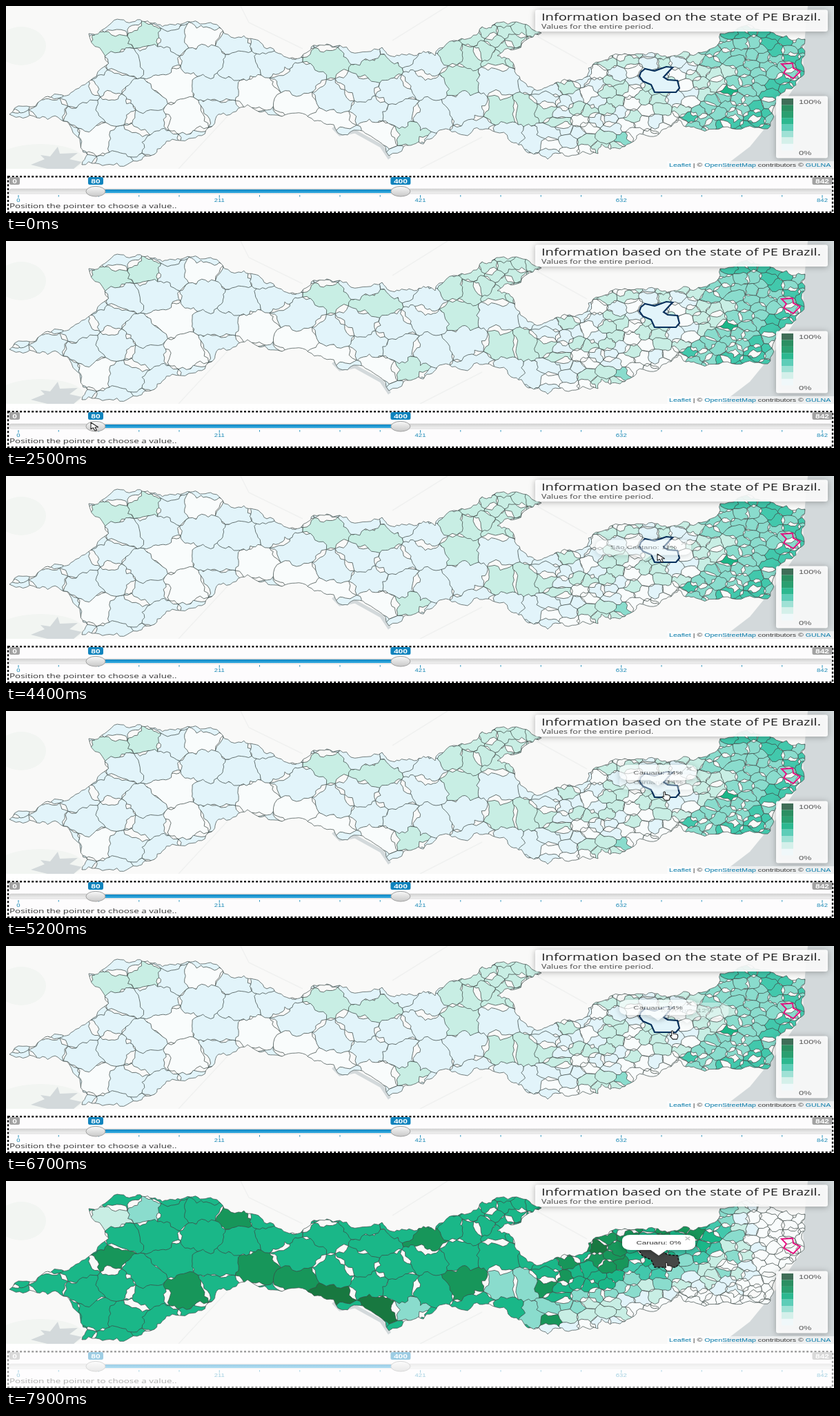
These frames come from a looping animation (1200x300 px, 8 s). An HTML page:

```html
<!DOCTYPE html>
<html lang="en">
<head>
<meta charset="utf-8">
<title>State map with range slider</title>
<style>
html, body { margin: 0; width: 100%; height: 100%; overflow: hidden; background: #fff; }
svg { display: block; width: 100%; height: 100%; }
text { font-family: "Liberation Sans", Arial, sans-serif; }
.ui { font-family: "Open Sans", sans-serif; }
.card { filter: drop-shadow(0 1px 4px rgba(0, 0, 0, .32)); }
</style>
</head>
<body>
<svg id="stage" viewBox="0 0 1200 300" preserveAspectRatio="none">
  <defs>
    <clipPath id="land"><path id="landClip"/></clipPath>
    <clipPath id="mapBox"><rect width="1200" height="236"/></clipPath>
    <linearGradient id="knob" x2="0" y2="1">
      <stop stop-color="#fafafa"/><stop offset=".5" stop-color="#e0e0e0"/><stop offset="1" stop-color="#c8c8c8"/>
    </linearGradient>
    <linearGradient id="groove" x2="0" y2="1">
      <stop stop-color="#d2d2d2"/><stop offset="1" stop-color="#f4f4f4"/>
    </linearGradient>
    <linearGradient id="range" x2="0" y2="1">
      <stop stop-color="#0f86c2"/><stop offset="1" stop-color="#35ace2"/>
    </linearGradient>
  </defs>
  <g clip-path="url(#mapBox)">
    <rect width="1200" height="236" fill="#f9f9f8"/>
    <g fill="#f2f5f2">
      <ellipse cx="22" cy="58" rx="36" ry="28"/>
      <ellipse cx="50" cy="222" rx="62" ry="22"/>
    </g>
    <path fill="none" stroke="#f0f1f0" stroke-width="1.5" d="M340 0 352 24 430 62M560 50 640 0M770 44 842 84M250 236 330 150M600 236 690 190"/>
    <path fill="#d3d9db" d="M1162 0H1200V236H1036L1078 204 1114 160 1156 98 1155 75Z"/>
    <path fill="#d3d9db" d="M36 230 56 222 50 216 64 218 75 204 78 214 104 213 92 222 110 226 98 236 60 236Z"/>
    <path fill="none" stroke="#d3d9db" stroke-width="5" d="M474 176 484 186 506 182 544 203 556 221"/>
    <g id="map"></g>
  </g>
  <g id="chrome"></g>
  <g id="panel"></g>
  <g id="popups"></g>
  <g id="pointer" stroke="#222" stroke-width="1.1" stroke-linejoin="round" fill="#fff">
    <path id="arrow" d="M0 0 0 9.5 3.2 7.6 6 12 8.4 11.2 6 7 10.5 6.8Z"/>
    <path id="hand" d="M3 1Q4.2-.6 5.4 1L5.6 4.6 8 4.4 12 5.8 12.4 9 11 12.5 5 12.5 1.2 8.2Q.6 6.2 3.4 7.6Z"/>
  </g>
</svg>
<script>
const NS = 'http://www.w3.org/2000/svg';
const LOOP = 8000, STEP = 100, RECALC = 7800, FADE = 300;
const SQUASH = 0.69;              // the whole page is flattened vertically
const TONES = ['#f9fcfc', '#e2f4fa', '#c8eee4', '#8adccd', '#42c8ac', '#1ab788', '#17965a', '#187840', '#454746'];
const $ = id => document.getElementById(id);
const clamp = (v, lo = 0, hi = 1) => Math.min(hi, Math.max(lo, v));

function add(parent, tag, attrs, text) {
  const el = document.createElementNS(NS, tag);
  for (const k in attrs) el.setAttribute(k, attrs[k]);
  if (text) el.textContent = text;
  parent.appendChild(el);
  return el;
}
const label = (parent, x, y, size, text, attrs) => add(parent, 'text', {
  transform: `translate(${x} ${y}) scale(1 ${SQUASH})`, 'font-size': size, fill: '#333', ...attrs }, text);

// ---- geometry ----
const points = s => s.split(' ').map(p => p.split(',').map(Number));
const noise = (x, y) => {
  const s = Math.sin(x * 12.9898 + y * 78.233) * 43758.5453;
  return s - Math.floor(s);
};
// Roughens an edge by shifting its middle; both directions give the same line.
function bend(p, q, k) {
  const dx = q[0] - p[0], dy = q[1] - p[1], len = Math.hypot(dx, dy);
  if (!k || len < 7) return [p];
  const mx = (p[0] + q[0]) / 2, my = (p[1] + q[1]) / 2;
  const s = (noise(Math.round(mx), Math.round(my)) - 0.5) * k * Math.min(1, 24 / len);
  const m = [mx - dy * s, my + dx * s];
  return [...bend(p, m, k), ...bend(m, q, k)];
}
const outline = (pts, k) => 'M' + pts.flatMap((p, i) => bend(p, pts[(i + 1) % pts.length], k))
  .map(p => p.map(v => v.toFixed(1)).join(' ')).join('L') + 'Z';

const north = '5,157 46,140 97,124 131,102 149,83 120,40 150,27 183,23 300,26 337,45 366,50 378,62 411,76 465,55 484,57 500,67 545,60 556,72 612,66 622,72 660,47 690,30 740,23 776,39 712,72 736,85 756,117 783,118 838,104 844,90 875,73 945,69 1000,70 1030,58 1035,40 1085,33 1158,48';
const south = '1157,95 1116,140 1104,178 1000,177 975,165 950,180 914,188 890,207 863,200 858,214 815,218 796,213 785,222 732,197 695,178 664,187 628,180 605,200 576,204 555,217 540,196 508,180 481,184 475,172 400,160 350,143 315,155 298,175 265,192 241,193 215,215 190,225 110,230 118,215 92,172 75,161 45,162';
const landPath = outline(points(`${north} ${south}`), 0.45);
$('landClip').setAttribute('d', landPath);

const map = $('map');
const land = add(map, 'g', { 'clip-path': 'url(#land)', stroke: '#3c4846', 'stroke-width': 0.75, 'stroke-linejoin': 'round' });
const fills = [];
function shape(before, after, d) {
  fills.push([add(land, 'path', { d }), before, after]);
}

// ---- districts: cells around key places and seeded scattered ones ----
// x, y, tone before and after the recalculation
const sites = [
  [152, 55, 2, 2], [205, 42, 2, 3], [240, 45, 1, 5], [288, 44, 0, 5], [328, 54, 1, 6], [150, 110, 1, 6],
  [238, 115, 0, 5], [60, 148, 1, 5], [130, 190, 0, 5], [205, 165, 1, 5], [262, 160, 0, 6], [360, 128, 0, 6],
  [425, 145, 0, 6], [468, 165, 0, 7], [465, 78, 2, 5], [535, 92, 2, 5], [530, 148, 1, 5], [545, 188, 0, 7],
  [585, 185, 2, 3], [612, 82, 1, 6], [655, 105, 2, 5], [715, 105, 1, 5], [665, 150, 1, 6], [722, 155, 2, 3],
  [756, 152, 2, 3], [768, 195, 1, 3], [790, 200, 0, 6], [857, 95, 0, 7], [895, 194, 3, 2], [992, 160, 4, 0], [1045, 123, 5, 0]
];
const isLobe = (x, y) => x > 645 && x < 785 && y < 72;
const gap = (x, y) => isLobe(x, y) ? 19 : x < 785 ? 42 : x < 980 ? 17 : 15;

function tones(x, y) {
  if (isLobe(x, y)) return [2, 5];
  if (x < 785) return [1, 5];
  const jitter = noise(x, y) - 0.5;
  const before = x < 995 ? 1 + jitter * 2.8 : 2 + (x - 1000) / 100 + Math.abs(y - 95) / 90 + jitter;
  const loss = Math.max(0, (x - 1000) / 40, (x - 780) / 130 + (y - 150) / 40);
  return [clamp(Math.round(before), 0, 4), clamp(Math.round(5.4 - 2.3 * loss + jitter * 1.6), 0, 6)];
}
const apart = (a, b) => Math.hypot(a[0] - b[0], (a[1] - b[1]) / SQUASH);
for (let i = 1; i < 9000; i++) {
  const x = noise(i, 1) * 1185, y = 15 + noise(i, 7) * 225, d = gap(x, y);
  if (sites.every(s => apart(s, [x, y]) > d)) sites.push([x, y, ...tones(x, y)]);
}

function cell([sx, sy]) {
  const w = 100, h = 75;
  let poly = [[sx - w, sy - h], [sx + w, sy - h], [sx + w, sy + h], [sx - w, sy + h]];
  for (const [ox, oy] of sites) {
    const nx = ox - sx, ny = oy - sy;
    if (!nx && !ny || Math.abs(nx) > 2 * w) continue;
    const side = p => (p[0] - sx - nx / 2) * nx + (p[1] - sy - ny / 2) * ny / SQUASH ** 2;
    poly = poly.flatMap((p, i) => {
      const q = poly[(i + 1) % poly.length], a = side(p), b = side(q), u = a / (a - b);
      const out = a <= 0 ? [p] : [];
      if (a * b < 0) out.push([p[0] + (q[0] - p[0]) * u, p[1] + (q[1] - p[1]) * u]);
      return out;
    });
  }
  return poly;
}
for (const s of sites) shape(s[2], s[3], outline(cell(s), 0.55));

const chosen = points('920,96 926,91 940,94 957,88 966,89 953,103 959,107 973,108 976,119 971,125 940,125 935,114 923,109 918,102');
const hovered = points('796,204 815,200 824,188 830,190 832,200 852,195 861,207 845,217 836,212 797,212');
shape(1, 8, outline(chosen));

add(map, 'path', { d: landPath, fill: 'none', stroke: '#4a5654', 'stroke-width': 0.75 });
const ring = (pts, stroke, width, dash = 'none') => add(map, 'path', {
  d: outline(pts), fill: 'none', stroke, 'stroke-width': width, 'stroke-dasharray': dash });
ring(points('1124,84 1140,83 1141,90 1151,95 1141,105 1127,97 1131,91'), '#e6107f', 1.9);
const navyRing = ring(chosen, '#07305c', 2.2);
const dashRing = ring(chosen, '#111', 1.6, '3 2.5');
const hoverRing = ring(hovered, '#111', 1.5);
const nextRing = ring(points('975,105 1000,104 1012,100 1015,110 985,122'), '#111', 1.1);

// ---- title, legend, credits ----
const chrome = $('chrome');
const card = (x, y, width, height) => add(chrome, 'rect', { x, y, width, height, rx: 3, fill: '#fff', 'fill-opacity': 0.9, class: 'card' });
card(767, 5.5, 424, 31.5);
label(chrome, 776, 20.5, 20.1, 'Information based on the state of PE Brazil.', { class: 'ui', fill: '#222', 'font-weight': 500 });
label(chrome, 776, 32.5, 12.5, 'Values for the entire period.', { class: 'ui', fill: '#444' });
card(1116, 130.5, 75, 90);
['#406e58', '#2b8f62', '#2b9f70', '#2db890', '#5ecdb8', '#9fe1d5', '#d4f0ea', '#f0f8fa'].forEach((fill, i) =>
  add(chrome, 'rect', { x: 1124, y: 134 + i * 9.4, width: 17, height: 9.5, fill }));
label(chrome, 1149, 142, 12.8, '100%', { fill: '#555' });
label(chrome, 1149, 216, 12.8, '0%', { fill: '#555' });
add(chrome, 'rect', { x: 958, y: 225, width: 242, height: 11, fill: '#fff', opacity: 0.6 });
const credit = label(chrome, 961, 233, 10.6, '');
[['Leaflet', 1], [' | © '], ['OpenStreetMap', 1], [' contributors © '], ['GULNA', 1]].forEach(([word, link]) =>
  add(credit, 'tspan', { fill: link ? '#0078a8' : '#333' }, word));

// ---- slider panel ----
const panel = $('panel');
const middle = { 'text-anchor': 'middle' };
const MAX = 842, RANGE = [80, 400];
const knobX = v => 32 + (v - 10) * 1.381 + 1.3;
add(panel, 'rect', { x: 3, y: 247.3, width: 1195, height: 51.7, fill: '#fdfcfd', stroke: '#111', 'stroke-width': 2.4, 'stroke-dasharray': '3 2.7' });
add(panel, 'rect', { x: 5, y: 265, width: 1192, height: 7, rx: 3, fill: 'url(#groove)', stroke: '#ccc', 'stroke-width': 0.6 });
add(panel, 'rect', { x: knobX(RANGE[0]), y: 266, width: knobX(RANGE[1]) - knobX(RANGE[0]), height: 5, fill: 'url(#range)' });
function tag(x, value, fill) {
  const text = String(value), w = 8 + text.length * 7;
  add(panel, 'rect', { x: x - w / 2, y: 248, width: w, height: 11, rx: 2.5, fill });
  label(panel, x, 256.5, 12, text, { ...middle, fill: '#fff', 'font-weight': 700 });
}
tag(12.5, 0, '#a2a2a2');
tag(1183, MAX, '#a2a2a2');
for (let i = 0; i <= 20; i++) {
  const big = i % 5 === 0, x = 18 + i * 58.25;
  add(panel, 'rect', { x: x - 0.5, y: 274, width: 1, height: big ? 4 : 2.5, fill: '#2a93bd' });
  if (big) label(panel, x, 283.5, 9.5, String(Math.round(MAX * i / 20 + 0.01)), { ...middle, fill: '#1687b4' });
}
for (const value of RANGE) {
  const cx = knobX(value);
  tag(cx, value, '#0f83bd');
  add(panel, 'ellipse', { cx, cy: 268.7, rx: 14, ry: 7.3, fill: 'url(#knob)', stroke: '#a0a0a0', 'stroke-width': 1 });
}
label(panel, 5, 293, 13.4, 'Position the pointer to choose a value..', { class: 'ui', fill: '#333' });

// ---- motion ----
// time, x, y of the pointer
const path = [
  [500, 674, 277], [800, 657, 262], [1100, 657, 262], [1400, 410, 223], [1500, 410, 223], [2400, 102, 250],
  [2500, 123, 263], [3100, 574, 268], [3200, 574, 268], [3400, 454, 258], [3800, 737, 250], [3900, 828, 198],
  [4000, 908, 133], [4400, 944, 113], [4900, 944, 113], [5300, 952, 118], [5700, 952, 118], [6000, 988, 112],
  [6300, 995, 141], [6800, 953, 118]
];
function pointerAt(t) {
  const i = path.findIndex(k => k[0] > t);
  if (i < 1) return path[i ? path.length - 1 : 0].slice(1);
  const a = path[i - 1], b = path[i], u = (t - a[0]) / (b[0] - a[0]);
  return [a[1] + (b[1] - a[1]) * u, a[2] + (b[2] - a[2]) * u];
}
function popup(text, cx, y, width, open, close) {
  const g = add($('popups'), 'g', { class: 'card' }), x = cx - width / 2;
  add(g, 'path', { d: `M${cx - 13} ${y + 21}L${cx} ${y + 30}L${cx + 13} ${y + 21}Z`, fill: '#fff' });
  add(g, 'rect', { x, y, width, height: 22, rx: 12, ry: 8, fill: '#fff' });
  label(g, cx, y + 13.5, 11.6, text, middle);
  label(g, x + width - 11, y + 8.5, 15, '×', { ...middle, fill: '#bbb', 'font-weight': 700 });
  return { g, open, close, late: close > RECALC };
}
const popups = [
  popup('São Caetano: 11%', 924, 92.5, 138, 4150, 4300),
  popup('Caruaru: 14%', 945, 92, 112, 4400, 5000),
  popup('Caruaru: 14%', 945, 78, 112, 5000, 5900),
  popup('Bezerros: 12%', 987, 82, 121, 5900, 6500),
  popup('Caruaru: 14%', 945, 78, 112, 6500, 7200),
  popup('Caruaru: 14%', 953, 90, 112, 7200, RECALC),
  popup('Caruaru: 0%', 946, 78, 106, RECALC - FADE, LOOP)
];

const show = (el, on) => el.setAttribute('visibility', on ? 'visible' : 'hidden');
let painted = null;
function draw(time) {
  const t = Math.floor(time % LOOP / STEP) * STEP;
  const during = (a, b) => t >= a && t < b;
  const faded = from => clamp((t - from) / FADE);
  const late = t >= RECALC;
  if (late !== painted) {
    for (const [el, before, after] of fills) el.setAttribute('fill', TONES[late ? after : before]);
    painted = late;
  }
  panel.setAttribute('opacity', 1 - 0.6 * clamp((t - RECALC + STEP) / (2 * STEP)));
  for (const p of popups) {
    const o = faded(p.open) - faded(p.close);
    show(p.g, o > 0 && p.late === late);
    p.g.setAttribute('opacity', o);
  }
  show(navyRing, t < 7300);
  show(dashRing, t >= 7300);
  show(hoverRing, during(3900, 4100));
  show(nextRing, during(5900, 6600));

  const [x, y] = pointerAt(t), hand = t >= 3900 && !during(4300, 5000);
  $('pointer').setAttribute('transform', `translate(${x} ${y})`);
  show($('arrow'), t >= 500 && !hand);
  show($('hand'), hand);
}
const start = performance.now();
function tick() {
  draw(performance.now() - start);
  requestAnimationFrame(tick);
}
tick();
</script>
</body>
</html>
```
